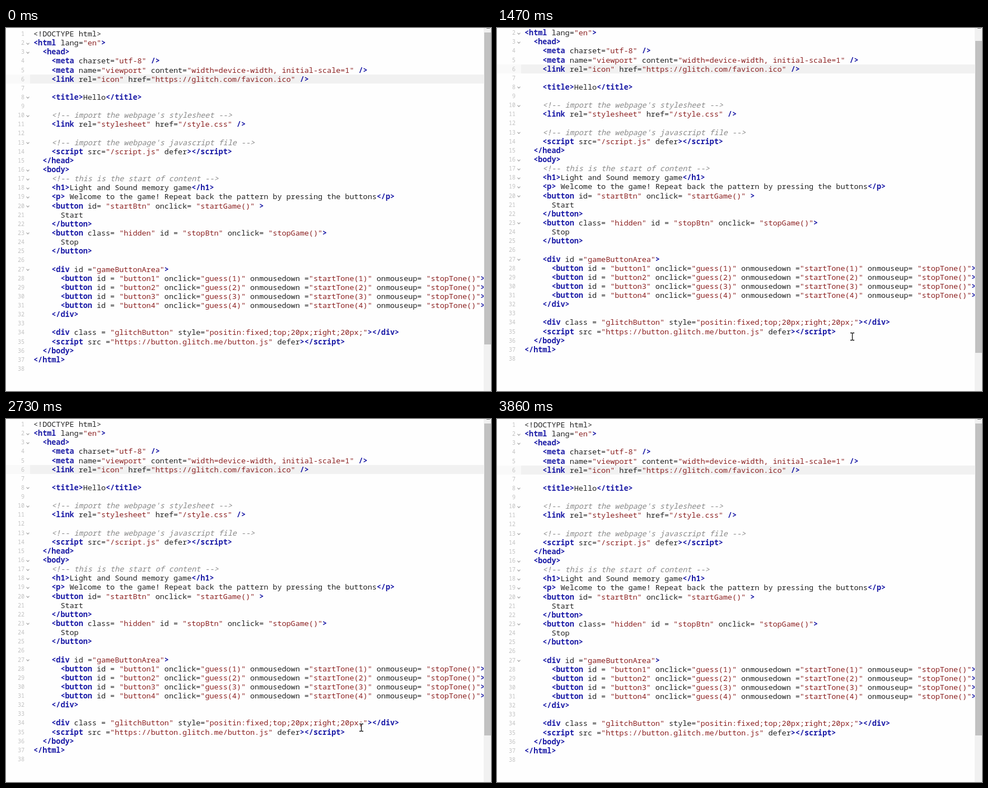
An HTML page for the animation above (5.07 s loop, 866 px wide and 647 px high).

```html
<!DOCTYPE html>
<html lang="en">
<head>
<meta charset="utf-8">
<title>Scrolling code editor</title>
<style>
  html, body { margin: 0; width: 100%; height: 100%; overflow: hidden; background: #fefefe; }
  #stage { position: relative; width: 866px; height: 647px; overflow: hidden; }
  #stage * { position: absolute; }
  #page { left: 0; top: 0; width: 853px; height: 647px; }
  #active { left: 0; top: 83.2px; width: 853px; height: 16.1px;
            background: linear-gradient(90deg, #f9f9f9 43px, #f1f1f1 43px); }
  .line { left: 49px; white-space: pre; color: #222;
          font: 13.44px/16.136px "Noto Sans Mono", monospace; font-variant-ligatures: none; }
  #stage .line span { position: static; }
  .tag { color: #1a1aa6; font-weight: 700; }
  .string { color: #8c2222; }
  .comment { color: #8a8a8a; font-style: italic; }
  .number { left: 0; width: 33px; text-align: right; color: #c2c2c2;
            font: 10px/16.136px "Noto Sans Mono", monospace; }
  .fold { left: 36.5px; width: 3px; height: 3px; border: solid #999; border-width: 0 1px 1px 0;
          transform: rotate(45deg); }
  #track { left: 853px; top: 0; width: 13px; height: 647px; background: #f1f1f1; }
  #thumb { left: 1px; top: 8px; width: 12px; height: 555.5px; background: #c1c1c1; }
  #arrow { left: 5px; top: 0; width: 6px; height: 1px; background: #777; }
  #cursor { left: 0; top: 0; overflow: visible; }
</style>
</head>
<body>
<div id="stage">
  <div id="page"><div id="active"></div></div>
  <div id="track"><div id="thumb"></div><div id="arrow"></div></div>
  <svg id="cursor" width="1" height="1" fill="none">
    <path id="beam" d="M-3.5-6.5H-1.5L0-5.8 1.5-6.5H3.5M0-6V6M-3.5 6.5H-1.5L0 5.8 1.5 6.5H3.5"
          stroke="#111" stroke-width="1.3"/>
  </svg>
</div>
<script>
// ‹ and › stand for angle brackets in the displayed document.
const code = `‹!DOCTYPE html›
‹html lang="en"›
  ‹head›
    ‹meta charset="utf-8" /›
    ‹meta name="viewport" content="width=device-width, initial-scale=1" /›
    ‹link rel="icon" href="https://glitch.com/favicon.ico" /›

    ‹title›Hello‹/title›

    ‹!-- import the webpage's stylesheet --›
    ‹link rel="stylesheet" href="/style.css" /›

    ‹!-- import the webpage's javascript file --›
    ‹script src="/script.js" defer›‹/script›
  ‹/head›
  ‹body›
    ‹!-- this is the start of content --›
    ‹h1›Light and Sound memory game‹/h1›
    ‹p› Welcome to the game! Repeat back the pattern by pressing the buttons‹/p›
    ‹button id= "startBtn" onclick= "startGame()" ›
      Start
    ‹/button›
    ‹button class= "hidden" id = "stopBtn" onclick= "stopGame()"›
      Stop
    ‹/button›

    ‹div id ="gameButtonArea"›
${[1, 2, 3, 4].map(n => `      ‹button id = "button${n}" onclick="guess(${n})" onmousedown ="startTone(${n})" onmouseup= "stopTone()"›`).join("\n")}
    ‹/div›

    ‹div class = "glitchButton" style="positin:fixed;top;20px;right;20px;"›‹/div›
    ‹script src ="https://button.glitch.me/button.js" defer›‹/script›
  ‹/body›
‹/html›
`;
const foldable = [2, 3, 8, 10, 13, 16, 17, 18, 19, 20, 23, 27];
const pitch = 16.136, loop = 5070;
const $ = id => document.getElementById(id);

function add(parent, className, text, top) {
  const el = parent.appendChild(document.createElement(parent === $("page") ? "div" : "span"));
  el.className = className;
  el.textContent = text.replace(/‹/g, "<").replace(/›/g, ">");
  if (top !== undefined) el.style.top = top + "px";
  return el;
}

function tokenClass(token) {
  if (token.startsWith("‹!--")) return "comment";
  if (token[0] === '"') return "string";
  return /^(‹[^!]|\/?›)/.test(token) ? "tag" : "";
}

code.split("\n").forEach((text, i) => {
  const top = 2 + i * pitch;
  const line = add($("page"), "line", "", top);
  const tokens = text.split(/(‹!.*›|‹\/?\w+|\/?›|"[^"]*")/).filter(Boolean);
  tokens.forEach(token => add(line, tokenClass(token), token));
  add($("page"), "number", String(i + 1), top);
  if (foldable.includes(i + 1)) add($("page"), "fold", "", top + 6.5);
});

// [time, scroll offset]; the scrollbar thumb lags one step behind the page.
const scrollSteps = [
  [0, 0], [830, 3], [910, 8], [980, 13], [1060, 17], [1140, 20],
  [1330, 19], [1400, 18.5], [1470, 18], [1540, 14], [1610, 10], [1680, 6], [1740, 3], [1810, 0], [1880, 0],
  [2730, 1], [2800, 2], [3010, 4], [3130, 7], [3200, 8], [3530, 3], [3600, 0], [3600, 0]
];
// [time, x, y]; no position means hidden.
const cursorSteps = [[0], [70, 717, 604.5], [240, 660, 568], [330, 634.5, 550], [3860]];

const stepAt = (steps, t) => steps.findLastIndex(step => step[0] <= t);

function draw(now) {
  const t = now % loop;
  const i = stepAt(scrollSteps, t);
  const lagged = scrollSteps[Math.max(0, i - 1)][1];
  $("page").style.top = -scrollSteps[i][1] + "px";
  $("thumb").style.top = 8 + lagged * 0.833 + "px";

  const [, x, y] = cursorSteps[stepAt(cursorSteps, t)];
  $("cursor").style.display = x === undefined ? "none" : "block";
  if (x !== undefined) $("beam").setAttribute("transform", `translate(${x} ${y})`);
}

const start = performance.now();
function tick() {
  draw(performance.now() - start);
  requestAnimationFrame(tick);
}
tick();
</script>
</body>
</html>
```
